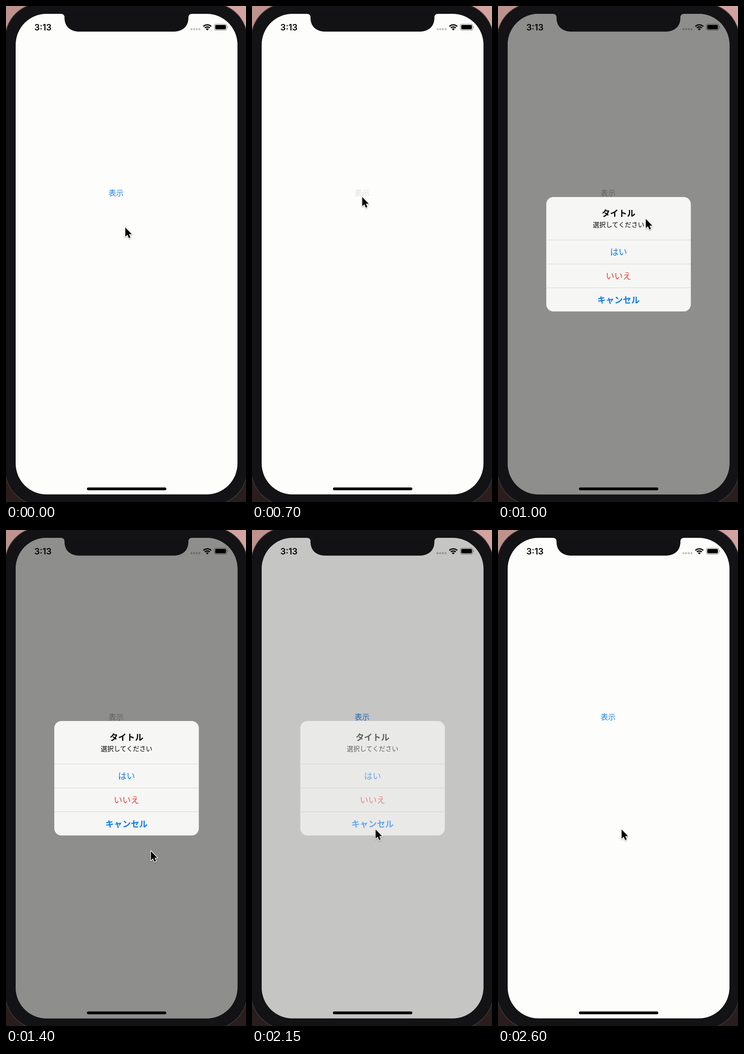
An HTML page that plays this animation: 521x1075 px, repeating every 2.65 s.

```html
<!DOCTYPE html>
<html lang="ja">
<head>
<meta charset="utf-8">
<title>Alert demo</title>
<style>
  html, body { margin: 0; width: 100%; height: 100%; overflow: hidden; background: #131315; }
  svg { display: block; width: 521px; height: 1075px; }
  text { font-family: "Noto Sans CJK JP", "Noto Sans CJK", sans-serif; text-anchor: middle; }
  .clock { font: 600 18.5px Inter, sans-serif; text-anchor: start; }
  .bold { font-weight: 700; }
</style>
</head>
<body>
<svg viewBox="0 0 521 1075">
  <defs>
    <linearGradient id="wallTop">
      <stop offset="0" stop-color="#bd918c"/>
      <stop offset="1" stop-color="#d3a3a0"/>
    </linearGradient>
    <clipPath id="screen">
      <rect x="21" y="17" width="481.5" height="1041.5" rx="67"/>
    </clipPath>
    <filter id="soft" x="-50%" y="-50%" width="200%" height="200%">
      <feDropShadow dx="0" dy="1.2" stdDeviation="1.2" flood-opacity=".4"/>
    </filter>
  </defs>

  <rect width="521" height="540" fill="url(#wallTop)"/>
  <rect y="540" width="521" height="535" fill="#2b1d1c"/>
  <rect x="-2" y="-6" width="526" height="1088" rx="78" fill="#131315" stroke="#39393b" stroke-width="1.5"/>

  <g clip-path="url(#screen)">
    <rect x="20" y="16" width="484" height="1045" fill="#fdfdfb"/>
    <text id="show" x="239" y="411" font-size="16.3">表示</text>
    <text class="clock" x="61.5" y="52.5">3:13</text>
    <path d="M402.6 50.3H421" stroke="#bcbcbc" stroke-width="4.4" stroke-linecap="round" stroke-dasharray="0 5.8"/>
    <g fill="none" stroke="#000" stroke-width="2.7">
      <path d="M428.4 44.2A12.4 12.4 0 0 1 445.6 44.2"/>
      <path d="M431.6 47.5A7.7 7.7 0 0 1 442.4 47.5"/>
    </g>
    <path d="M437 53L433.9 49.9A4.4 4.4 0 0 1 440.1 49.9Z"/>
    <rect x="452.3" y="39.2" width="27" height="13.2" rx="3.6" fill="none" stroke="#888" stroke-width="1.1"/>
    <rect x="454.2" y="41" width="23.2" height="9.6" rx="2"/>
    <path d="M480.8 43.6Q483 45.8 480.8 48Z" fill="#777"/>
    <rect id="dim" x="20" y="16" width="484" height="1045"/>
    <rect x="175.7" y="1043.5" width="172.3" height="6" rx="3"/>
    <path d="M119 16V17Q127 17 127 25C127 45 140 55.5 160 55.5H363C383 55.5 396 45 396 25Q396 17 404 17V16Z" fill="#121214"/>
  </g>

  <g id="alert">
    <g id="panel">
      <rect x="104.8" y="414" width="313.8" height="248" rx="15.5" fill="#f6f6f5"/>
      <path d="M105 507H418.5M105 559H418.5M105 610.7H418.5" stroke="#d6d6d4" fill="none"/>
    </g>
    <g id="labels" font-size="18.4">
      <text class="bold" x="261.7" y="456">タイトル</text>
      <text x="261.7" y="479.3" font-size="14.1">選択してください</text>
      <text x="261.7" y="540" fill="#0a7bf5">はい</text>
      <text x="261.7" y="592" fill="#e53a30">いいえ</text>
      <text class="bold" x="261.7" y="643.5" fill="#0a7bf5">キャンセル</text>
    </g>
  </g>

  <path id="cursor" d="M0 0V20L4.5 15.8L7.8 23L11.2 21.6L8 14.5H14Z" stroke="#fff" stroke-width="2.6"
        stroke-linejoin="round" paint-order="stroke" filter="url(#soft)"/>
</svg>
<script>
const LOOP = 2650, STEP = 50;
const PRESS = 650, OPEN = 700, CLOSE = 2090, FADE = 300;
const CENTER = [261.7, 538];

// The pointer rests at four spots; each move bends towards a control point.
const rest = [259, 480], button = [239.3, 414], below = [314.5, 696], cancel = [268.3, 649];
const moves = [
  { start: 100, end: 500, from: rest, bend: [247, 440], to: button },
  { start: 800, end: 1290, from: button, bend: [394, 436], to: below },
  { start: 1500, end: 1900, from: below, bend: [290, 676], to: cancel }
];

const el = id => document.getElementById(id);
const show = el("show"), dim = el("dim"), alertBox = el("alert");
const panel = el("panel"), labels = el("labels"), cursor = el("cursor");

const progress = (t, start, end) => Math.min(1, Math.max(0, (t - start) / (end - start)));
const smooth = x => x * x * (3 - 2 * x);
const easeOut = x => 1 - (1 - x) ** 3;

function pointer(t) {
  const { start, end, from, bend, to } = moves.findLast(m => t >= m.start) || moves[0];
  const u = smooth(progress(t, start, end)), v = 1 - u;
  return from.map((a, i) => v * v * a + 2 * u * v * bend[i] + u * u * to[i]);
}

function draw(t) {
  const opened = easeOut(progress(t, OPEN, OPEN + FADE));
  const closed = easeOut(progress(t, CLOSE, CLOSE + FADE));
  const shown = opened - closed;
  const scale = 1.2 - .2 * opened;
  const [cx, cy] = CENTER;
  const grey = 222 - 52 * opened;

  show.setAttribute("fill", t >= PRESS && t < CLOSE ? `rgb(${grey},${grey},${grey})` : "#1f80e8");
  dim.setAttribute("opacity", .44 * shown);
  alertBox.setAttribute("transform", `translate(${cx} ${cy}) scale(${scale}) translate(${-cx} ${-cy})`);
  panel.setAttribute("opacity", shown ** .45);
  labels.setAttribute("opacity", shown ** .8);
  cursor.setAttribute("transform", `translate(${pointer(t)})`);
}

const start = performance.now();
function tick() {
  const t = (performance.now() - start) % LOOP;
  draw(Math.floor(t / STEP) * STEP);
  requestAnimationFrame(tick);
}
tick();
</script>
</body>
</html>
```
